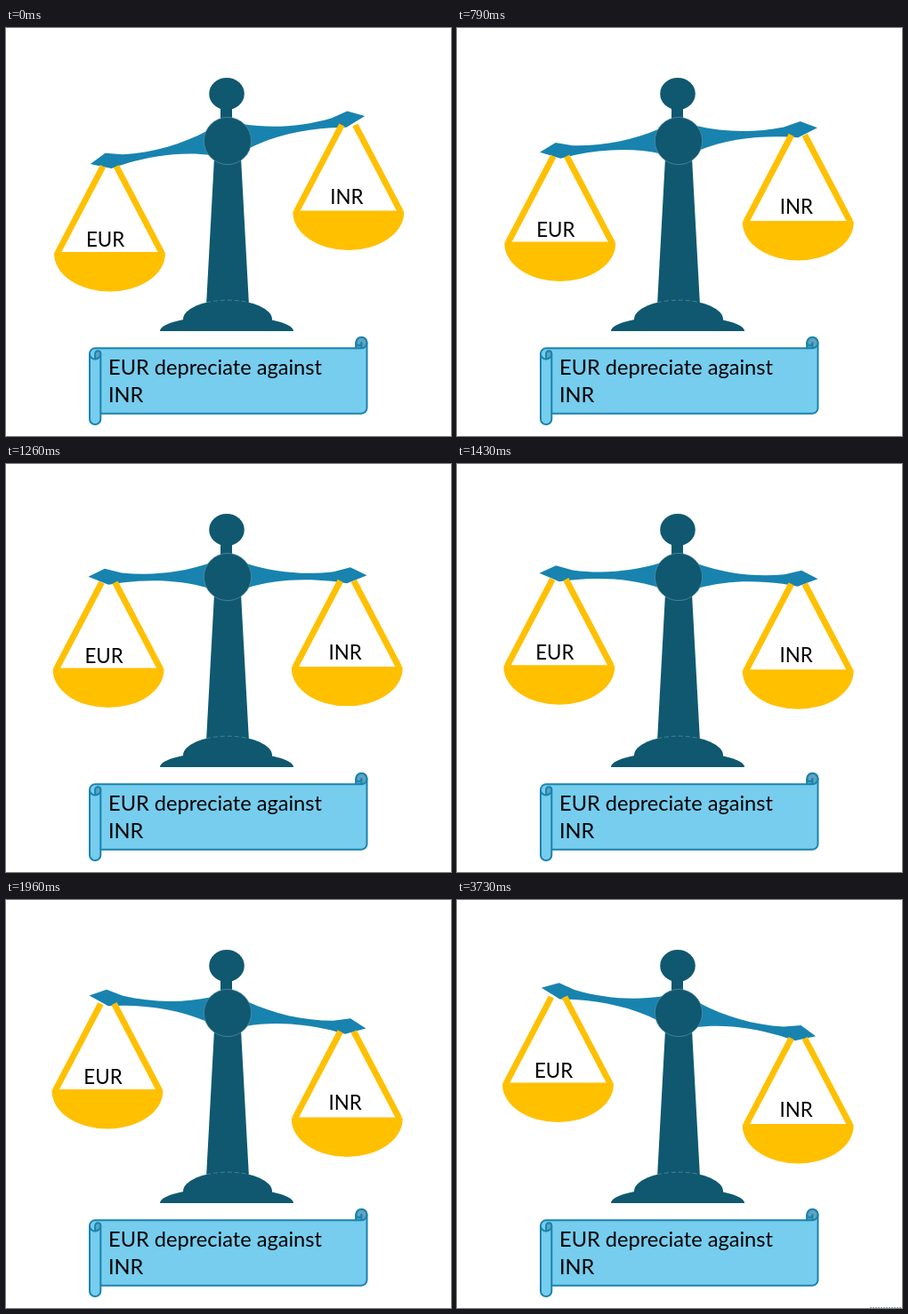
An HTML page that plays this animation: 500x459 px, repeating every 3.89 s.

```html
<!DOCTYPE html>
<html lang="en">
<head>
<meta charset="utf-8">
<title>Currency scale</title>
<style>
  html, body { margin: 0; width: 100%; height: 100%; overflow: hidden; background: #fff; }
  svg { display: block; width: 100vw; height: 100vh; }
  text { font-family: Lato, "Open Sans", sans-serif; fill: #000; }
  .label { font-size: 22.3px; text-anchor: middle; }
  .caption { font-size: 23.6px; }
  .gold { fill: #ffc000; }
  .straps { fill: none; stroke: #ffc000; stroke-width: 7; }
  .post { fill: #0f5870; }
  .seam { fill: none; stroke: #5f93a6; stroke-width: .7; }
  .paper { fill: #76cdee; stroke: #1a83ad; stroke-width: 2; stroke-linejoin: round; }
  .curl { fill: #5ea4bf; }
  .edge { fill: none; }
</style>
</head>
<body>
<svg viewBox="0 0 500 459">
  <defs>
    <path id="arm" d="M-156.5 0L-138-9L-119-4.2C-85-.5-52-4-20-14.5V14C-52 4-85 3-117 6.5L-134 9Z"/>
    <g id="pan">
      <path class="straps" d="M-7.5-96.5L-58.5 1M7.5-96.5L58.5 1"/>
      <path class="gold" d="M-62 0H62Q62.4 1 62.4 2A62.4 42.5 0 0 1-62.4 2Q-62.4 1-62 0Z"/>
    </g>
  </defs>

  <g id="beam" fill="#1883af">
    <use href="#arm"/>
    <use href="#arm" transform="scale(-1 1)"/>
  </g>

  <g class="post">
    <path d="M241 88H254V106H241ZM234 146H264L273 312H225Z"/>
    <ellipse cx="248" cy="74" rx="19.8" ry="18"/>
    <path d="M173 341A75 17 0 0 1 323 341Z"/>
    <path d="M199 328A50 22 0 0 1 299 328V331H199Z"/>
    <circle cx="249" cy="127" r="26.6"/>
  </g>
  <circle class="seam" cx="249" cy="127" r="26.6"/>
  <path class="seam" d="M225 308.8Q249 303.5 273 308.8" stroke-dasharray="5 3"/>

  <g id="left"><use href="#pan"/><text class="label" x="-5" y="-6">EUR</text></g>
  <g id="right"><use href="#pan"/><text class="label" x="-2" y="-8">INR</text></g>

  <g class="paper">
    <path d="M94 366.4A6.1 6.1 0 0 1 100.1 360.3H393.3V354.1A6.1 6.1 0 0 1 405.5 354.1V427.6A6.1 6.1 0 0 1 399.4 433.7H106.3V439.9A6.1 6.1 0 0 1 94 439.9Z"/>
    <path class="curl" d="M393.3 360.3V354.1A6.1 6.1 0 0 1 405.5 354.1A6.1 6.1 0 0 1 399.4 360.3Z"/>
    <path d="M399.4 360.3V354.1A3 3 0 0 1 393.3 354.1" class="edge"/>
    <path class="curl" d="M100.1 372.6V366.4A3.1 3.1 0 0 1 106.3 366.4A6.1 6.1 0 0 1 100.1 372.6Z"/>
    <path class="edge" d="M94 366.4A6.1 6.1 0 0 0 100.1 372.6M106.3 366.4V433.7"/>
  </g>
  <text class="caption" x="115" y="390">EUR depreciate against</text>
  <text class="caption" x="115" y="420.5">INR</text>

  <path id="rule" d="M464 458.5H500" stroke="#8ba3ab" stroke-dasharray="2 1"/>
</svg>
<script>
  const LOOP = 3890, RULE_START = 3730;
  const STEPS = [
    310, 390, 470, 550, 630, 710, 790,
    860, 940, 1010, 1110, 1180, 1250, 1330,
    1430, 1500, 1580, 1650, 1730, 1800, 1880,
    1960, 2040, 2110, 2190, 2260, 2340
  ];
  const byId = id => document.getElementById(id);
  const mix = (a, b, p) => a + (b - a) * p;
  const move = (id, x, y) => byId(id).setAttribute("transform", `translate(${x} ${y})`);

  // Fraction of the tilt done: discrete steps, even speed with softened ends.
  function tilt(time) {
    const x = STEPS.filter(step => step <= time).length / STEPS.length;
    return x + 0.6 * x * (1 - x) * (2 * x - 1) ** 3;
  }

  function draw(time) {
    const p = tilt(time);
    byId("beam").setAttribute("transform", `translate(249 126) rotate(${mix(-9.9, 10, p)})`);
    move("left", mix(116.5, 113.5, p), mix(252, 205.5, p));
    move("right", 383.2 + 1.6 * (1 - p) ** 10, mix(205.5, 252, p));
    byId("rule").style.display = time >= RULE_START ? "" : "none";
  }

  const start = performance.now();
  function tick() {
    draw((performance.now() - start) % LOOP);
    requestAnimationFrame(tick);
  }
  draw(0);
  requestAnimationFrame(tick);
</script>
</body>
</html>
```
